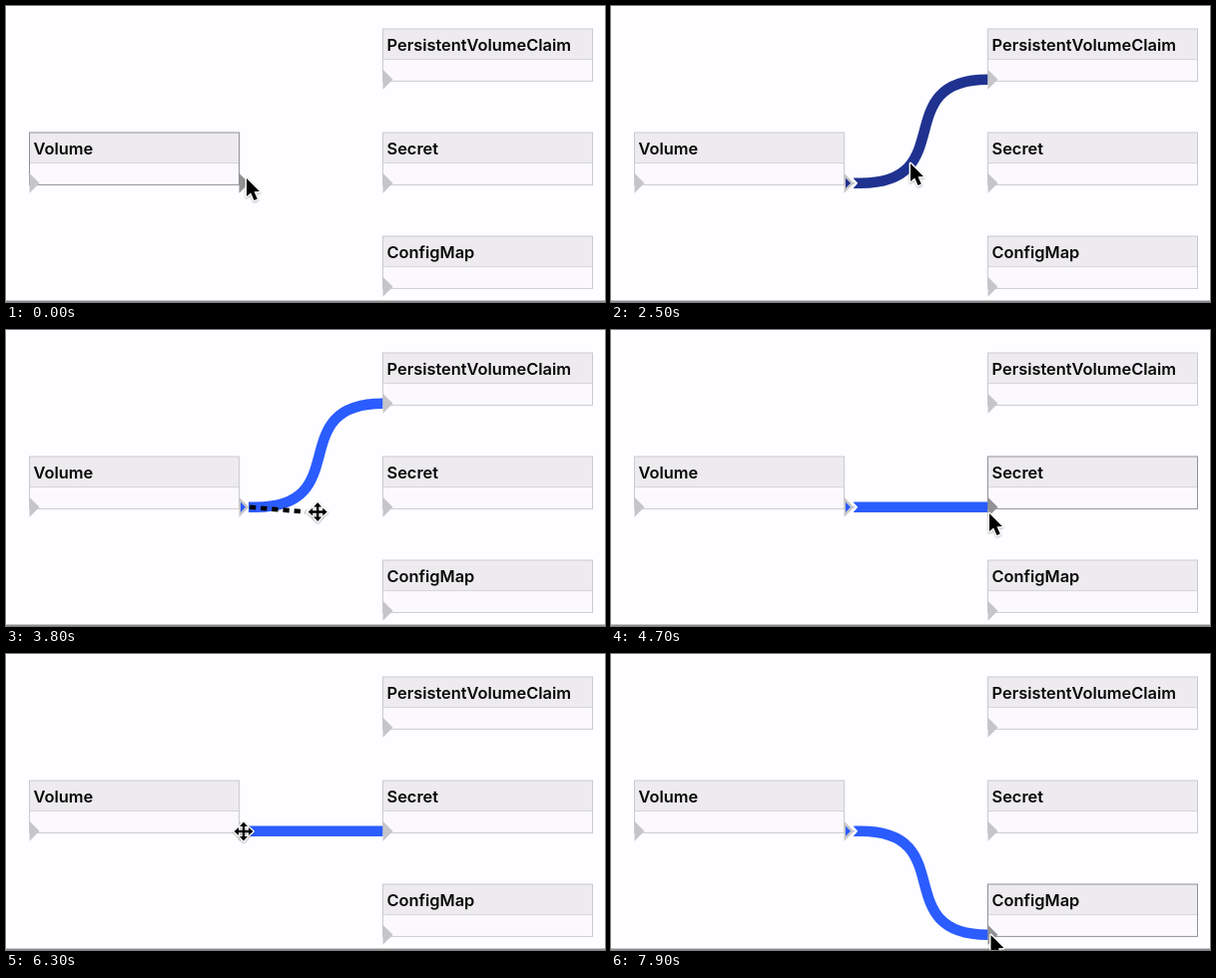
Write an HTML page with a canvas that moves like this. It is 600 px wide and 297 px high and loops after 8 s.

```html
<!DOCTYPE html>
<html lang="en">
<head>
<meta charset="utf-8">
<title>Connecting nodes</title>
<style>
  html, body { margin: 0; width: 100%; height: 100%; overflow: hidden; background: #fefdff; }
  canvas { display: block; width: 100vw; height: 100vh; }
</style>
</head>
<body>
<canvas id="stage" width="600" height="297"></canvas>
<script>
const ctx = document.getElementById('stage').getContext('2d');
const LOOP = 8000, STEP = 100;
const BACK = '#fefdff', BLUE = '#2b5cff', DARK_BLUE = '#1f3290';
const LIGHT = '#c6c5c8', ACTIVE = '#929194';
const NODE_W = 210, NODE_H = 52.4, HEAD_H = 30.6, PORT = 10, LINK_W = 10.5;

const targets = ['PersistentVolumeClaim', 'Secret', 'ConfigMap']
  .map((label, row) => ({ label, x: 377.5, y: 23 + row * 104 }));
const [claim, secret, config] = targets;
const volume = { label: 'Volume', x: 23.5, y: 127, output: true };
const nodes = [volume, ...targets];

const portY = node => node.y + 50.8;
const start = { x: 244, y: portY(volume) };
const home = { x: 241, y: 172 };

// Each move eases the pointer to a point; a drag ends at its release time.
const moves = [
  { from: 200, to: 1100, x: 379, y: 76, release: 1800, target: claim },
  { from: 1800, to: 2500, x: 300, y: 157 },
  { from: 2500, to: 3400, x: 237, y: 182 },
  { from: 3600, to: 4500, x: 379, y: 183, release: 4700, target: secret },
  { from: 4800, to: 5400, x: 263, y: 179 },
  { from: 5500, to: 6100, x: 238, y: 178 },
  { from: 6300, to: 6900, x: 380.5, y: 281, release: 7400, target: config }
];

const easeOut = k => 1 - (1 - k) ** 3;

function pointerAt(t) {
  let point = home;
  for (const { from, to, x, y } of moves) {
    if (t < from) break;
    const k = easeOut(Math.min(1, (t - from) / (to - from)));
    point = { x: point.x + (x - point.x) * k, y: point.y + (y - point.y) * k };
  }
  return point;
}

function isOver(node, { x, y }) {
  return x > node.x - 1 && x < node.x + NODE_W + (node.output ? PORT : 0) &&
    y > node.y && y < portY(node) + PORT;
}

function linkPath(target) {
  const path = new Path2D(), bend = 100, startX = start.x + 6, endY = portY(target);
  path.moveTo(start.x - 1, start.y);
  path.lineTo(startX, start.y);
  path.bezierCurveTo(startX + bend, start.y, target.x - bend, endY, target.x, endY);
  return path;
}

function polyline(points) {
  const path = new Path2D();
  points.forEach(([x, y]) => path.lineTo(x, y));
  return path;
}

function stroke(path, color, width) {
  ctx.strokeStyle = color;
  ctx.lineWidth = width;
  ctx.stroke(path);
}

function drawPort(x, y, color, size = PORT) {
  ctx.fillStyle = color;
  ctx.fill(polyline([[x, y - size], [x + size, y], [x, y + size]]));
}

function drawNode(node, active) {
  const { x, y, label } = node;
  ctx.fillStyle = '#fbf9fd';
  ctx.fillRect(x, y, NODE_W, NODE_H);
  ctx.fillStyle = '#edebee';
  ctx.fillRect(x, y, NODE_W, HEAD_H);
  stroke(polyline([[x, y + HEAD_H], [x + NODE_W, y + HEAD_H]]), '#d4d3d6', 1);
  ctx.strokeStyle = active ? ACTIVE : '#cbcacd';
  ctx.strokeRect(x, y, NODE_W, NODE_H);
  ctx.fillStyle = '#080808';
  ctx.font = '600 16.4px Inter, sans-serif';
  ctx.fillText(label, x + 4, y + 21.8);
}

function drawPorts(node, active) {
  drawPort(node.x, portY(node), active && !node.output ? ACTIVE : LIGHT);
  if (node.output) drawPort(node.x + NODE_W, portY(node), active ? ACTIVE : LIGHT);
}

function drawLinkStart(color, dragging) {
  const { x, y } = start;
  drawPort(x - 9, y, color, 5);
  if (!dragging) stroke(polyline([[x - 4, y - 6], [x + 1.5, y], [x - 4, y + 6]]), BACK, 2.6);
}

function drawDashes(end) {
  ctx.setLineDash([6.3, 4.9]);
  stroke(polyline([[start.x, start.y], [end.x, end.y]]), '#000', 4.6);
  ctx.setLineDash([]);
}

const arrow = polyline([[0, 1], [0, 19], [4.2, 15.5], [7.5, 23], [10.8, 21.5], [7.5, 14.3], [13, 14]]);
arrow.closePath();
const arm = polyline([[-1.2, 1], [-1.2, -5], [-4, -5], [0, -9.5], [4, -5], [1.2, -5], [1.2, 1]]);

function drawCursor({ x, y }, moving) {
  const shape = moving ? arm : arrow, turns = moving ? 4 : 1;
  ctx.save();
  ctx.translate(x, y);
  ctx.lineJoin = 'round';
  ctx.shadowColor = 'rgba(0,0,0,.3)';
  ctx.shadowBlur = 2;
  ctx.shadowOffsetY = 1;
  for (let i = 0; i < turns; i++) {
    stroke(shape, '#fff', 2.8);
    ctx.rotate(Math.PI / 2);
  }
  if (!moving) ctx.rotate(-Math.PI / 2);
  ctx.shadowColor = 'transparent';
  ctx.fillStyle = '#000';
  for (let i = 0; i < turns; i++) {
    ctx.fill(shape);
    ctx.rotate(Math.PI / 2);
  }
  ctx.restore();
}

function draw(t) {
  const pointer = pointerAt(t);
  const drag = moves.find(m => t >= m.from && t < m.release);
  const linked = moves.findLast(m => t >= m.release)?.target;
  const hovered = drag && t < drag.to ? null : nodes.find(node => isOver(node, pointer));

  ctx.fillStyle = BACK;
  ctx.fillRect(0, 0, 600, 297);
  ctx.fillStyle = '#747376';
  ctx.fillRect(0, 295.6, 600, 1.2);

  nodes.forEach(node => drawNode(node, node === hovered));
  let color = BLUE;
  if (linked) {
    const path = linkPath(linked);
    ctx.lineWidth = LINK_W;
    if (!drag && !hovered && ctx.isPointInStroke(path, pointer.x, pointer.y)) color = DARK_BLUE;
    stroke(path, color, LINK_W);
  }
  nodes.forEach(node => drawPorts(node, node === hovered));
  if (linked) drawLinkStart(color, drag);
  // The loose end trails slightly behind the pointer.
  if (drag) drawDashes(pointerAt(t - 40));
  drawCursor(pointer, drag && !hovered);
}

const begin = performance.now();
function tick() {
  const t = (performance.now() - begin) % LOOP;
  draw(Math.floor(t / STEP) * STEP);
  requestAnimationFrame(tick);
}
tick();
</script>
</body>
</html>
```
